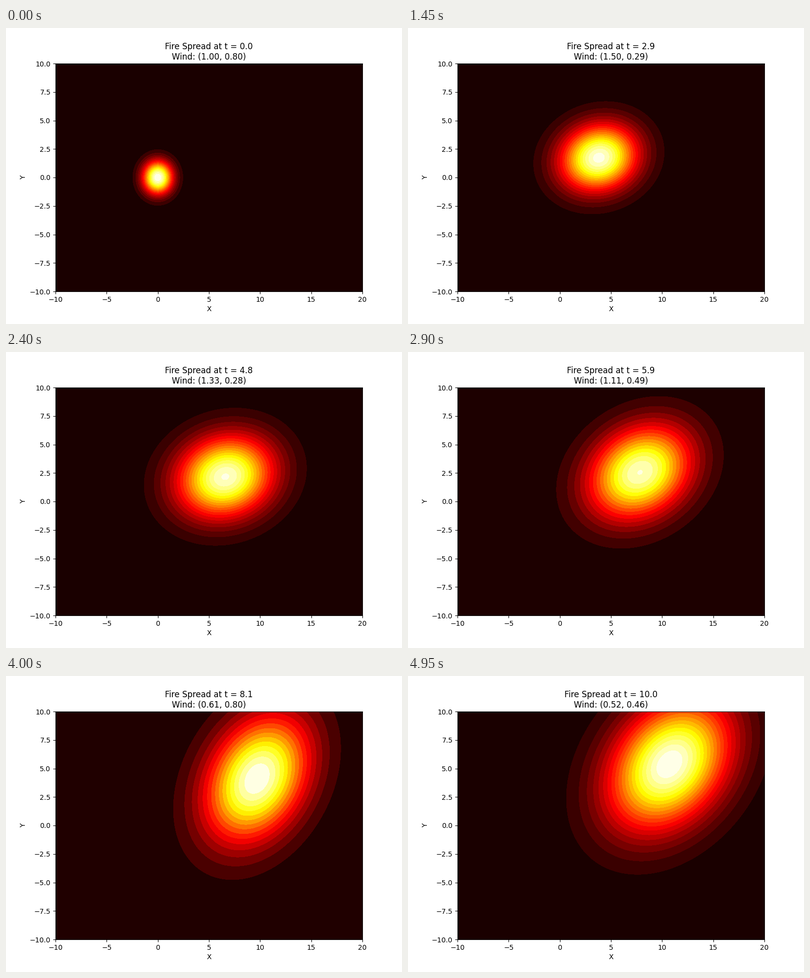
Recreate the animation shown at these times as a matplotlib script. Size 800x600 px, loop 5000 ms.

```python
import numpy as np
import matplotlib.pyplot as plt
from matplotlib.animation import FuncAnimation

FRAMES = 100
INTERVAL = 50  # ms

times = np.linspace(0, 10, FRAMES)
X, Y = np.meshgrid(np.linspace(-10, 20, 200), np.linspace(-10, 10, 200))

fig, ax = plt.subplots(figsize=(8, 6), dpi=100)


def wind(t):
    return 1 + 0.5 * np.sin(0.5 * t), 0.5 + 0.3 * np.cos(0.8 * t)


def drift(t):
    """Integral of the wind from 0 to t."""
    return t + 1 - np.cos(0.5 * t), 0.5 * t + 0.375 * np.sin(0.8 * t)


def fire(t):
    """Normalised Gaussian, stretched along the current wind direction."""
    wx, wy = wind(t)
    cx, cy = drift(t)
    angle = np.arctan2(wy, wx)
    c, s = np.cos(angle), np.sin(angle)
    along = c * (X - cx) + s * (Y - cy)
    across = -s * (X - cx) + c * (Y - cy)
    var_along, var_across = 1 + 2 * t, 1 + t
    shape = np.exp(-0.5 * (along**2 / var_along + across**2 / var_across))
    return shape / (2 * np.pi * np.sqrt(var_along * var_across))


def update(i):
    t = times[i]
    wx, wy = wind(t)
    ax.clear()
    ax.contourf(X, Y, fire(t), levels=20, cmap="hot")
    ax.set_title(f"Fire Spread at t = {t:.1f}\nWind: ({wx:.2f}, {wy:.2f})")
    ax.set_xlabel("X")
    ax.set_ylabel("Y")
    return []


anim = FuncAnimation(fig, update, frames=FRAMES, interval=INTERVAL,
                     repeat=True, repeat_delay=0)
plt.show()
```
